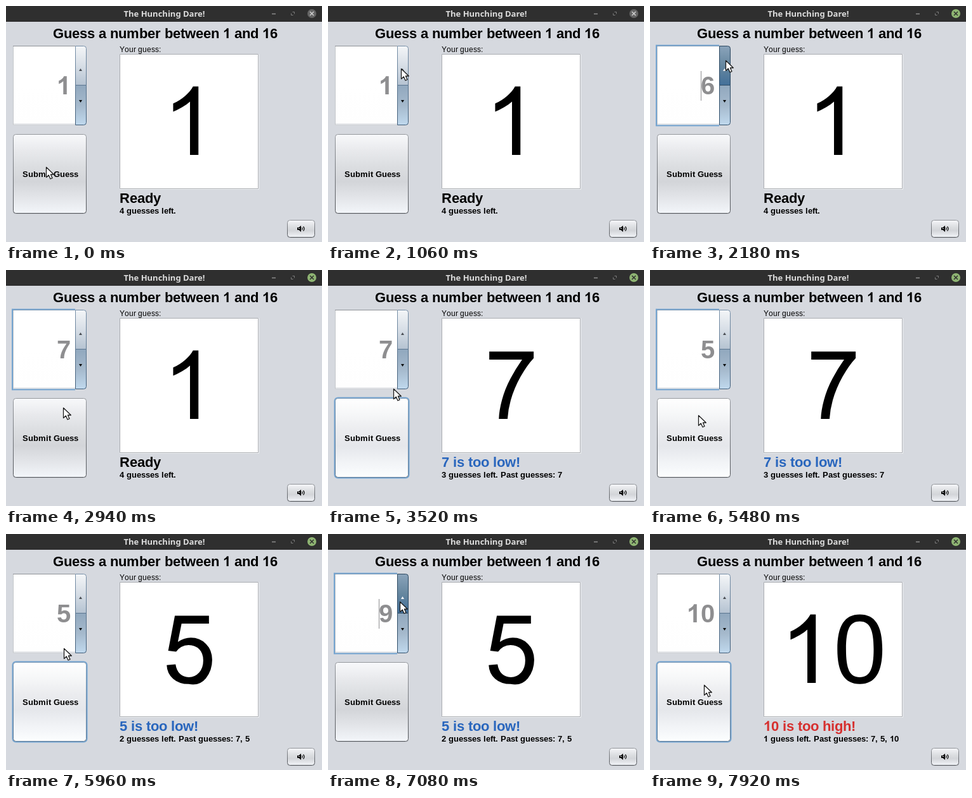
Write an HTML page with a canvas that moves like this. It is 498 px wide and 374 px high and loops after 8 s.

```html
<!DOCTYPE html>
<html>
<head>
<meta charset="utf-8">
<title>Number game</title>
<style>
html, body { margin: 0; width: 100%; height: 100%; overflow: hidden; background: #d6d9df; }
canvas { display: block; }
</style>
</head>
<body>
<canvas id="stage" width="498" height="374"></canvas>
<script>
const ctx = document.getElementById('stage').getContext('2d');
const LOOP = 8000;
const SANS = '"Liberation Sans", Arial, sans-serif';

// Digit outlines in 2048 units per em, y up.
const BOLD_ONE = new Path2D('M807 0H526V1059Q372 915 163 846V1101Q273 1137 402 1237.5T579 1472H807Z');
const DIGITS = {
  1: new Path2D('M763 0H583V1147Q518 1085 412.5 1023T223 930V1104Q374 1175 487 1276T647 1472H763Z'),
  7: new Path2D('M97 1274V1447H1046V1307Q906 1158 768 911T556 403Q502 213 487 0H302Q305 168 368 406T548.5 864.5T799 1274Z'),
  5: new Path2D('M85 384L274 400Q295 262 371.5 192.5T556 123Q686 123 776 221T866 481Q866 635 779.5 724T553 813Q466 813 396 773.5T286 671L117 693L259 1446H988V1274H403L324 880Q456 972 601 972Q793 972 925 839T1057 497Q1057 266 922.5 98T555 -25Q351 -25 222 89T85 384Z'),
  0: new Path2D('M85 724C85 1230 240 1472 565 1472S1046 1230 1046 724 890 -25 565 -25 85 218 85 724ZM270 724C270 1160 355 1324 563 1324S861 1160 861 724 775 123 563 123 270 288 270 724Z')
};

// Timeline: the last entry whose time has passed is current.
const VALUE = [[0, 1], [1940, 2], [2000, 3], [2060, 4], [2120, 5], [2180, 6], [2320, 7],
  [4500, 6], [4960, 5], [6920, 6], [6980, 7], [7080, 9], [7220, 10]];
const PRESSED = [[0, ''], [1500, 'up'], [2320, ''], [3180, 'submit'], [3340, ''], [4140, 'down'], [4500, ''],
  [4880, 'down'], [4960, ''], [5600, 'submit'], [5680, ''], [6500, 'up'], [7220, ''], [7700, 'submit'], [7880, '']];
const FOCUS = [[0, ''], [1500, 'spinner'], [3180, 'submit'], [4140, 'spinner'], [5600, 'submit'],
  [6500, 'spinner'], [7700, 'submit']];
const CARET = [[0, false], [1500, true], [2800, false], [4140, true], [4960, false], [6500, true], [7220, false]];
const BLUE = '#2966bd', RED = '#d6302f';
const RESULT = [
  [0, { guess: '1', text: 'Ready', color: '#000', note: '4 guesses left.' }],
  [3340, { guess: '7', text: '7 is too low!', color: BLUE, note: '3 guesses left. Past guesses: 7' }],
  [5680, { guess: '5', text: '5 is too low!', color: BLUE, note: '2 guesses left. Past guesses: 7, 5' }],
  [7880, { guess: '10', text: '10 is too high!', color: RED, note: '1 guess left. Past guesses: 7, 5, 10' }]
];

const easeInOut = u => u < .5 ? 2 * u * u : 1 - 2 * (1 - u) ** 2;
const easeOut = u => 1 - (1 - u) ** 2;
// Pointer moves: start, end, target x, target y, easing.
const MOVES = [
  [580, 1180, 119, 86, easeInOut],
  [2560, 3020, 88, 226, easeInOut],
  [3380, 3840, 117, 152, easeOut],
  [5060, 5540, 75, 232, easeInOut],
  [5780, 6180, 113, 107, easeInOut],
  [7240, 7460, 85, 239, easeInOut]
];

const AREAS = { editor: [11, 63, 98, 126], up: [109, 63, 18, 63], down: [109, 126, 18, 63], submit: [11, 203, 116, 126] };

const SKIN = {
  normal: ['#f8f9fb', '#e9eaed', '#dcdee1', '#d3d5d9', '#e3e5e9', '#f3f6fa'],
  hover: ['#ffffff', '#f6f7f8', '#ebecef', '#e5e7eb', '#f1f3f6', '#fcfeff'],
  pressed: ['#b5bdc9', '#a9b3c2', '#9ca8b9', '#a0adbf', '#b3c0d1', '#c9d5e4'],
  up: ['#f4f6f8', '#d7dee6', '#b4c2d1'],
  upHover: ['#ffffff', '#e4ebf2', '#c5d3e2'],
  down: ['#91a8be', '#a5b9cc', '#c0d9ee'],
  downHover: ['#a4bbd1', '#b7cadd', '#d4ebfc'],
  arrowPressed: ['#8ba4bb', '#66879f', '#426f99']
};

const current = (list, t) => list.filter(e => e[0] <= t).pop()[1];

function pointer(t) {
  let x = 63, y = 255;
  for (const [start, end, tx, ty, ease] of MOVES) {
    if (t < start) break;
    const k = ease(Math.min(1, (t - start) / (end - start)));
    x += (tx - x) * k;
    y += (ty - y) * k;
  }
  return [Math.round(x), Math.round(y)];
}

function areaAt([px, py]) {
  return Object.keys(AREAS).find(name => {
    const [x, y, w, h] = AREAS[name];
    return px >= x && px < x + w && py >= y && py < y + h;
  });
}

function glyph(path, x, y, size) {
  ctx.save();
  ctx.translate(x, y);
  ctx.scale(size / 2048, -size / 2048);
  ctx.fill(path, 'evenodd');
  ctx.restore();
}

// Text with whole-pixel advances.
function text(str, x, y, size, color = '#000', weight = 'bold') {
  ctx.font = `${weight} ${size}px ${SANS}`;
  ctx.fillStyle = color;
  for (const ch of str) {
    if (ch === '1') glyph(BOLD_ONE, x, y, size);
    else ctx.fillText(ch, x, y);
    x += Math.round(ctx.measureText(ch).width);
  }
}

function gradient(y, h, colors) {
  const g = ctx.createLinearGradient(0, y, 0, y + h);
  colors.forEach((c, i) => g.addColorStop(i / (colors.length - 1), c));
  return g;
}

function box(x, y, w, h, r, fill, stroke, width = 1) {
  ctx.beginPath();
  ctx.roundRect(x, y, w, h, r);
  if (fill) { ctx.fillStyle = fill; ctx.fill(); }
  if (stroke) { ctx.strokeStyle = stroke; ctx.lineWidth = width; ctx.stroke(); }
}

function line(d, color, width = 1) {
  ctx.strokeStyle = color;
  ctx.lineWidth = width;
  ctx.stroke(new Path2D(d));
}

function shape(d, color) {
  ctx.fillStyle = color;
  ctx.fill(new Path2D(d));
}

function button(x, y, w, h, skin) {
  box(x + .5, y + 1.5, w - 1, h - 1, 4, null, '#c3c6cc');
  box(x + .5, y + .5, w - 1, h - 1, 4, gradient(y, h, SKIN[skin]), gradient(y, h, ['#95989d', '#505358']));
}

function titleBar(active) {
  ctx.fillStyle = '#2f2f2f';
  ctx.fillRect(0, 0, 498, 25);
  ctx.font = '600 13px "Noto Sans", "Open Sans", sans-serif';
  ctx.fillStyle = '#dcdcdc';
  ctx.textAlign = 'center';
  ctx.fillText('The Hunching Dare!', 249.5, 17);
  ctx.textAlign = 'left';
  line('M419 12.5H425', '#8c8c8c', 1.5);
  line('M451.5 9.5H454.5V12.5M449.5 11.5V14.5H452.5', '#7c7c7c');
  ctx.beginPath();
  ctx.arc(482, 12, 7, 0, 7);
  ctx.fillStyle = active ? '#8fb573' : '#656565';
  ctx.fill();
  line('M479 9L485 15M485 9L479 15', active ? '#2f2f2f' : '#d0d0d0', 1.5);
}

function spinner(t, over, pressed, focused) {
  box(11, 63, 98, 126, 0, gradient(63, 126, ['#ffffff', '#ffffff', '#fefefe']));
  ctx.fillStyle = '#e5e7ea';
  ctx.fillRect(12, 186, 97, 2);
  line('M11.5 63V189', '#c4c7cb');
  line('M11 188.5H109', '#d0d2d6');
  line('M11 63.5H109', '#8f9297');
  if (focused) {
    line('M109 62.5H10V189.5H109', '#73a4d1', 2);
  }
  const skin = name => SKIN[pressed === name ? 'arrowPressed' : over === name ? name + 'Hover' : name];
  const edge = gradient(63, 126, pressed === 'up' ? ['#2c4860', '#31506c'] : ['#7890a8', '#3f5c78']);
  box(109.5, 63.5, 17, 62, [0, 4, 0, 0], gradient(63, 63, skin('up')), edge);
  box(109.5, 125.5, 17, 63, [0, 0, 4, 0], gradient(126, 63, skin('down')), edge);
  shape('M115 103L117.5 99 120 103Z', pressed === 'up' ? '#fff' : '#4a4e54');
  shape('M115 149L117.5 153 120 149Z', pressed === 'down' ? '#fff' : '#000');
  const value = String(current(VALUE, t));
  text(value, 102 - 22 * value.length, 140, 40, '#8e8e90');
  if (current(CARET, t)) line('M80.5 103V150', '#8e8e90');
}

function speaker() {
  button(443, 339, 44, 28, 'normal');
  shape('M459 351H461.5L465 348V358L461.5 355H459Z', '#000');
  line('M466.5 351Q468 353 466.5 355M468.5 349.5Q471.5 353 468.5 356.5', '#000', 1.2);
  line('M460.5 352.5H463', '#d9dbdf');
}

function drawPointer([x, y], beam) {
  ctx.save();
  ctx.translate(x, y);
  if (beam) {
    const d = 'M-2.5 -6.5H3.5M.5 -6.5V6.5M-2.5 6.5H3.5';
    ctx.lineCap = 'square';
    line(d, '#111', 3.2);
    line(d, '#fff', 1);
  } else {
    const d = 'M.5 .5V16.5L4.3 13 7 19 10 17.7 7.4 12H12.3Z';
    ctx.lineJoin = 'round';
    shape(d, '#fff');
    line(d, '#1c1c1c', 1.3);
  }
  ctx.restore();
}

function draw(t) {
  const pressed = current(PRESSED, t), focus = current(FOCUS, t);
  const result = current(RESULT, t);
  const over = t < 20 ? '' : areaAt(pointer(t - 100));

  ctx.fillStyle = '#d6d9df';
  ctx.fillRect(0, 0, 498, 374);
  titleBar(t >= 1500);
  text('Guess a number between 1 and 16', 74, 51, 22);
  text('Your guess:', 179, 73, 12, '#000', 'normal');

  box(179.5, 76.5, 219, 214, 0, null, '#eef0f3');
  box(179.5, 76.5, 218, 213, 0, '#fff', '#a9acb1');
  ctx.fillStyle = '#000';
  [...result.guess].forEach((d, i) => glyph(DIGITS[d], 289 - 42 * result.guess.length + 84 * i, 236, 151));
  text(result.text, 179, 312, 22, result.color);
  text(result.note, 179, 329, 13);

  spinner(t, over, pressed, focus === 'spinner');
  button(...AREAS.submit, pressed === 'submit' ? 'pressed' : over === 'submit' ? 'hover' : 'normal');
  if (focus === 'submit') box(10.5, 202.5, 117, 127, 5, null, '#73a4d1', 2);
  text('Submit Guess', 26, 271, 13);
  speaker();
  drawPointer(pointer(t), areaAt(pointer(t - 40)) === 'editor');
}

const begin = performance.now();
function tick() {
  draw((performance.now() - begin) % LOOP);
  requestAnimationFrame(tick);
}
tick();
</script>
</body>
</html>
```
